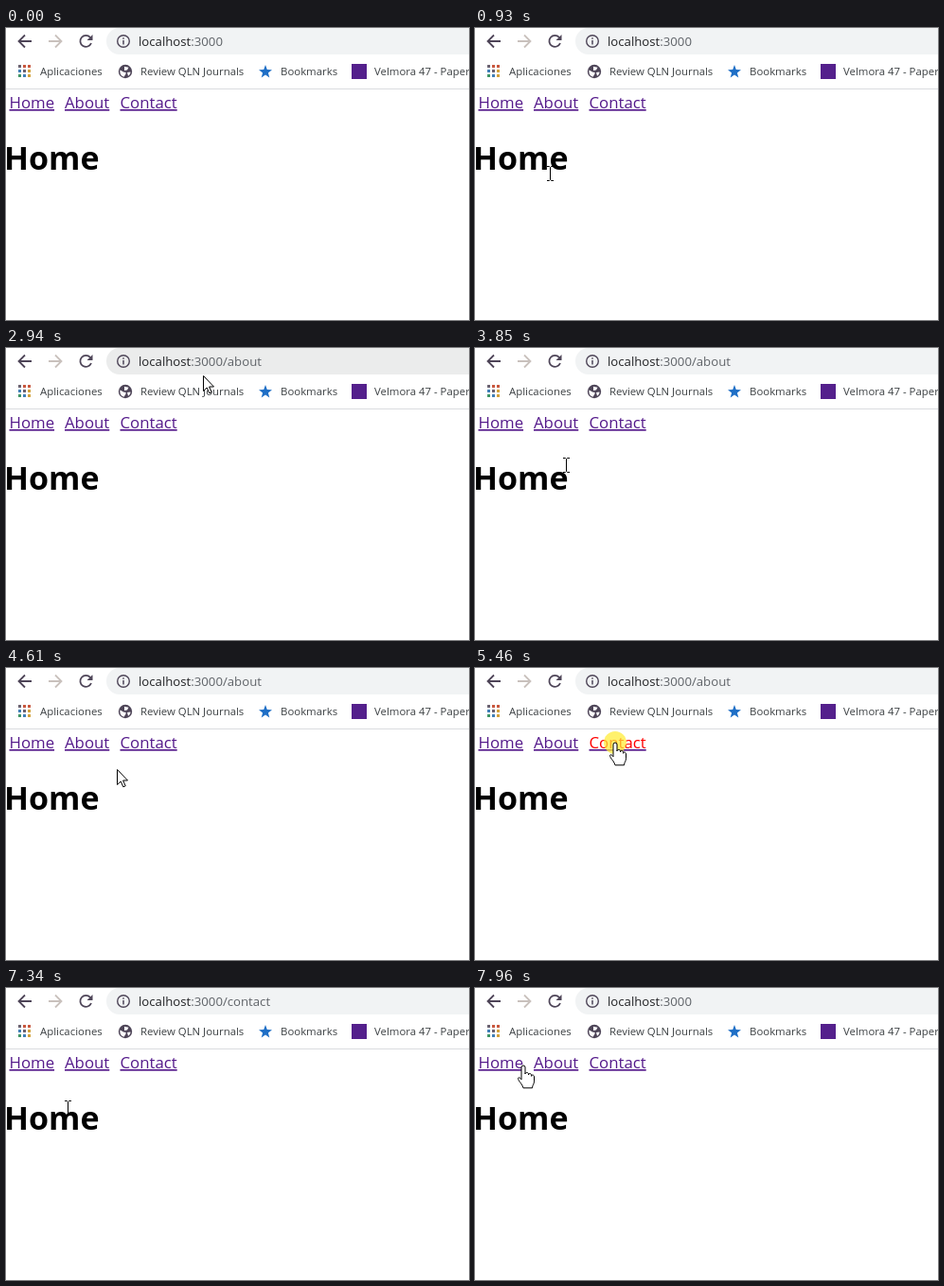
Animation, 489 px wide and 309 px high, one loop 8 s. Source, as an HTML page:

```html
<!DOCTYPE html>
<html lang="es">
<head>
<meta charset="utf-8">
<style>
  html, body { margin: 0; width: 100%; height: 100%; overflow: hidden; background: #fff; }
  svg { display: block; width: 489px; height: 309px; font-family: "Open Sans", "Noto Sans", sans-serif; }
  .icon { fill: none; stroke: #4e4558; stroke-width: 1.8; }
  .marks { font-size: 11.4px; fill: #3c4043; }
  .links { font-size: 16.8px; fill: #551a8b; text-decoration: underline; text-decoration-thickness: 1px; }
  .pointer { stroke: #000; stroke-width: 1; fill: #fff; stroke-linejoin: round; }
</style>
</head>
<body>
<svg viewBox="0 0 489 309">
  <rect id="bar" x="106" y="0" width="420" height="28" rx="14"/>
  <path class="icon" d="M27 14H14M20 7.5L13.5 14l6.5 6.5"/>
  <path class="icon" style="stroke:#c9c1bd" d="M45 14h13M52 7.5l6.500 6.500-6.500 6.500"/>
  <path class="icon" d="M89 10a6 6 0 1 0 1 6"/>
  <path fill="#4e4558" d="M91.500 7v6h-6z"/>
  <circle class="icon" cx="124" cy="14" r="6.300" style="stroke-width:1.400"/>
  <path class="icon" style="stroke-width:1.500" d="M124 13v4.500M124 10.300v1.500"/>
  <text x="140" y="19" font-size="13.2" fill="#202124">localhost<tspan id="path" fill="#5f6368"></tspan></text>

  <g id="apps"></g>
  <circle cx="126" cy="46" r="7.200" fill="#4e4558"/>
  <path fill="#fff" d="M120.500 44.500l4 2.200 2 0v2l-2 3c-3-.7-4.500-3.500-4-7.200zM125 40.800l4.500 1-1.500 2.700-3 .5zM128 47l3.500-.5c0 2-1 3.500-2.500 4.300z"/>
  <path id="star" fill="#1f6fc6"/>
  <rect x="365" y="38" width="16" height="16" fill="#54208c"/>
  <g class="marks">
    <text x="36" y="50">Aplicaciones</text>
    <text x="142" y="50">Review QLN Journals</text>
    <text x="290" y="50">Bookmarks</text>
    <text x="389" y="50">Velmora 47 - Paper notes</text>
  </g>
  <path stroke="#dadce0" d="M0 64.500H489"/>

  <g class="links">
    <text x="3.500" y="85">Home</text>
    <text x="62" y="85">About</text>
    <text x="120.500" y="85">Contact</text>
  </g>
  <text x="-2" y="150" font-size="34" font-weight="700">Home</text>

  <g id="cursor">
    <circle id="halo" r="12" fill="#ffec33" opacity=".72"/>
    <path id="shape" class="pointer"/>
  </g>
</svg>
<script>
const $ = id => document.getElementById(id);
const LOOP = 8000, STEP = 77;

const shapes = {
  arrow: 'M.5 .5V16.500l3.700-3.500 2.600 5.800 2.400-1-2.600-5.800H11.500z',
  beam: 'M-3-7.500h2.500l1 1 1-1h2.500M.5-6.500V6.500M-3 7.500h2.500l1-1 1 1h2.500',
  hand: 'M-2 13V2a2 2 0 0 1 4 0v7c0-2 3.500-2 3.500 0v1c0-2 3-2 3 .3v1c0-2 3-1.500 3 .5v5c0 3-2 4-2 7H0c-1-4-3.500-5.500-5-8.500-1.500-3 1-3.500 3-.5z'
};

// Each move is a list of [time, x, y]; the pointer rests between moves.
const moves = [
  [[520, 315, 261], [751, 165, 194], [905, 79, 154], [1090, 55, 118], [1300, 53, 95]],
  [[1380, 58, 91], [1680, 83, 75]],
  [[2460, 95, 70], [3076, 245, 15], [3230, 242, 20]],
  [[3460, 232, 27], [3845, 96, 124], [4150, 82, 139]],
  [[4380, 88, 134], [4850, 148, 79]],
  [[5860, 156, 73], [6250, 247, 20]],
  [[6490, 232, 31], [7120, 70, 143]],
  [[7260, 69, 138], [7640, 51, 82]]
];
const links = [[4, 51], [62, 110], [121, 181]];
const clicks = [[2160, 1, '/about'], [5460, 2, '/contact'], [7720, 0, '']];
const HOLD = 150;
const linkTexts = document.querySelectorAll('.links text');

const dots = ['#6b6270', '#c8583f', '#c8583f', '#3f7fb8', '#6b6270', '#d2a23c', '#3f9564', '#3f7fb8', '#d2a23c'];
$('apps').innerHTML = dots.map((c, i) =>
  `<rect x="${13 + i % 3 * 5}" y="${39 + (i / 3 | 0) * 5}" width="3" height="3" fill="${c}"/>`).join('');

const starPoints = Array.from({ length: 10 }, (_, i) => {
  const r = i % 2 ? 3.1 : 7.4, a = i * Math.PI / 5;
  return (274 + r * Math.sin(a)).toFixed(1) + ' ' + (46.5 - r * Math.cos(a)).toFixed(1);
});
$('star').setAttribute('d', 'M' + starPoints.join('L') + 'z');

function pointerAt(t) {
  const move = moves.filter(m => m[0][0] <= t).pop();
  if (!move) return null;
  const start = move[0][0];
  const q = start + Math.floor((t - start) / STEP) * STEP;
  const next = move.findIndex(p => p[0] > q);
  if (next < 0 || t >= move[move.length - 1][0]) return move[move.length - 1].slice(1);
  const a = move[next - 1], b = move[next], k = (q - a[0]) / (b[0] - a[0]);
  return [1, 2].map(i => Math.round(a[i] + (b[i] - a[i]) * k));
}

function shapeAt(x, y) {
  if (y > 67 && y < 91 && links.some(([l, r]) => x >= l && x <= r)) return 'hand';
  const inBar = y < 29 && x > 106, inHeading = y > 114 && y < 162 && x < 100;
  return inBar || inHeading ? 'beam' : 'arrow';
}

function draw(t) {
  const pressed = clicks.find(([s]) => t >= s && t < s + HOLD);
  const visited = clicks.filter(([s]) => t >= s + HOLD).pop();
  $('path').textContent = ':3000' + (visited ? visited[2] : '');
  linkTexts.forEach((el, i) => el.style.fill = pressed && pressed[1] === i ? '#f00' : '');
  $('halo').style.display = pressed ? '' : 'none';

  const p = pointerAt(t);
  $('cursor').style.display = p ? '' : 'none';
  $('bar').style.fill = p && p[1] < 32 ? '#ebecec' : '#f1f3f4';
  if (!p) return;
  const kind = shapeAt(...p);
  $('cursor').setAttribute('transform', `translate(${p})`);
  $('shape').setAttribute('d', shapes[kind]);
  $('shape').style.fill = kind === 'beam' ? 'none' : '';
}

const began = performance.now();
function frame() {
  draw((performance.now() - began) % LOOP);
  requestAnimationFrame(frame);
}
frame();
</script>
</body>
</html>
```
